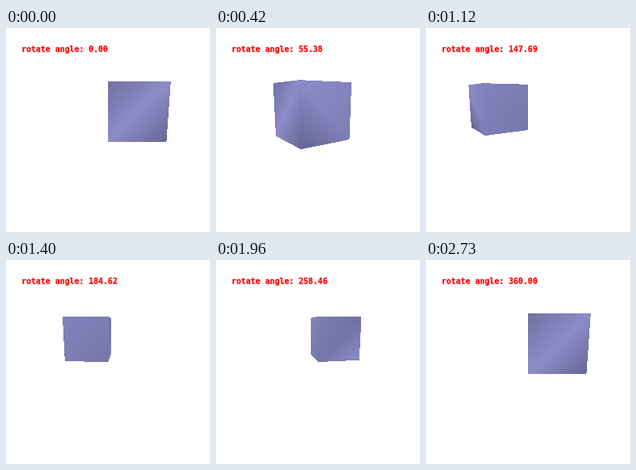
These frames come from a looping animation (256 px wide and 256 px high, 2.8 s). An HTML page with a canvas:

```html
<!DOCTYPE html>
<html lang="en">
<head>
<meta charset="utf-8">
<title>Rotating cube</title>
<style>
  html, body { margin: 0; width: 100%; height: 100%; overflow: hidden; background: #fff; }
  canvas, svg { position: absolute; left: 0; top: 0; width: 100vw; height: 100vh; display: block; }
  canvas { image-rendering: pixelated; }
  text {
    font: bold 10px "DejaVu Sans Mono", monospace;
    fill: #f00; stroke: #f00; stroke-width: 0.25px; white-space: pre;
  }
</style>
</head>
<body>
<canvas id="view" width="256" height="256"></canvas>
<svg viewBox="0 0 256 256"><text id="label" x="19.5" y="29.5">rotate angle: 0.00</text></svg>
<script>
const SIZE = 256, STEPS = 40, STEP_MS = 70;
const FOCAL = 128 / Math.tan(Math.PI / 6), DIST = 4, PITCH = 12 * Math.PI / 180;
const SIN_P = Math.sin(PITCH), COS_P = Math.cos(PITCH);

// Corner index bits: x = 4, y = 2, z = 1. The pivot is the edge x = z = 0.
const triangles = ["064", "026", "032", "013", "276", "237", "467", "475", "045", "051", "157", "173"];
// Grey level of each corner, blended across the faces.
const shade = [118, 140, 125, 113, 126, 102, 131, 140];

const label = document.getElementById("label");
const ctx = document.getElementById("view").getContext("2d");
const image = ctx.createImageData(SIZE, SIZE);

function project(i, angle) {
  const x = i >> 2, y = i >> 1 & 1, z = i & 1;
  const s = Math.sin(angle), c = Math.cos(angle);
  const rx = x * c - z * s, rz = x * s + z * c;
  const k = FOCAL / (DIST - rz * COS_P - y * SIN_P);
  return { x: 128 + rx * k, y: 128 - (y * COS_P - rz * SIN_P) * k, v: shade[i] };
}

const cross = (a, b, x, y) => (b.x - a.x) * (y - a.y) - (b.y - a.y) * (x - a.x);

function fillTriangle(a, b, c) {
  const area = cross(a, b, c.x, c.y);
  if (area > -0.01) return; // turned away from the viewer
  const xs = [a.x, b.x, c.x], ys = [a.y, b.y, c.y];
  const right = Math.ceil(Math.max(...xs)), bottom = Math.ceil(Math.max(...ys));
  for (let y = Math.floor(Math.min(...ys)); y < bottom; y++) {
    for (let x = Math.floor(Math.min(...xs)); x < right; x++) {
      const u = cross(b, c, x + 0.5, y + 0.5) / area;
      const v = cross(c, a, x + 0.5, y + 0.5) / area;
      const w = 1 - u - v;
      if (u < -1e-9 || v < -1e-9 || w < -1e-9) continue;
      const level = u * a.v + v * b.v + w * c.v;
      const p = (y * SIZE + x) * 4;
      image.data[p] = image.data[p + 1] = level;
      image.data[p + 2] = level * 1.44;
    }
  }
}

function draw(step) {
  const degrees = step * 360 / (STEPS - 1);
  const points = shade.map((_, i) => project(i, degrees * Math.PI / 180));
  image.data.fill(255);
  for (const t of triangles) fillTriangle(...[...t].map(i => points[i]));
  ctx.putImageData(image, 0, 0);
  label.textContent = "rotate angle: " + degrees.toFixed(2);
}

let shown = -1;
function tick() {
  const step = Math.floor(performance.now() / STEP_MS) % STEPS;
  if (step !== shown) draw(shown = step);
  requestAnimationFrame(tick);
}
tick();
</script>
</body>
</html>
```
